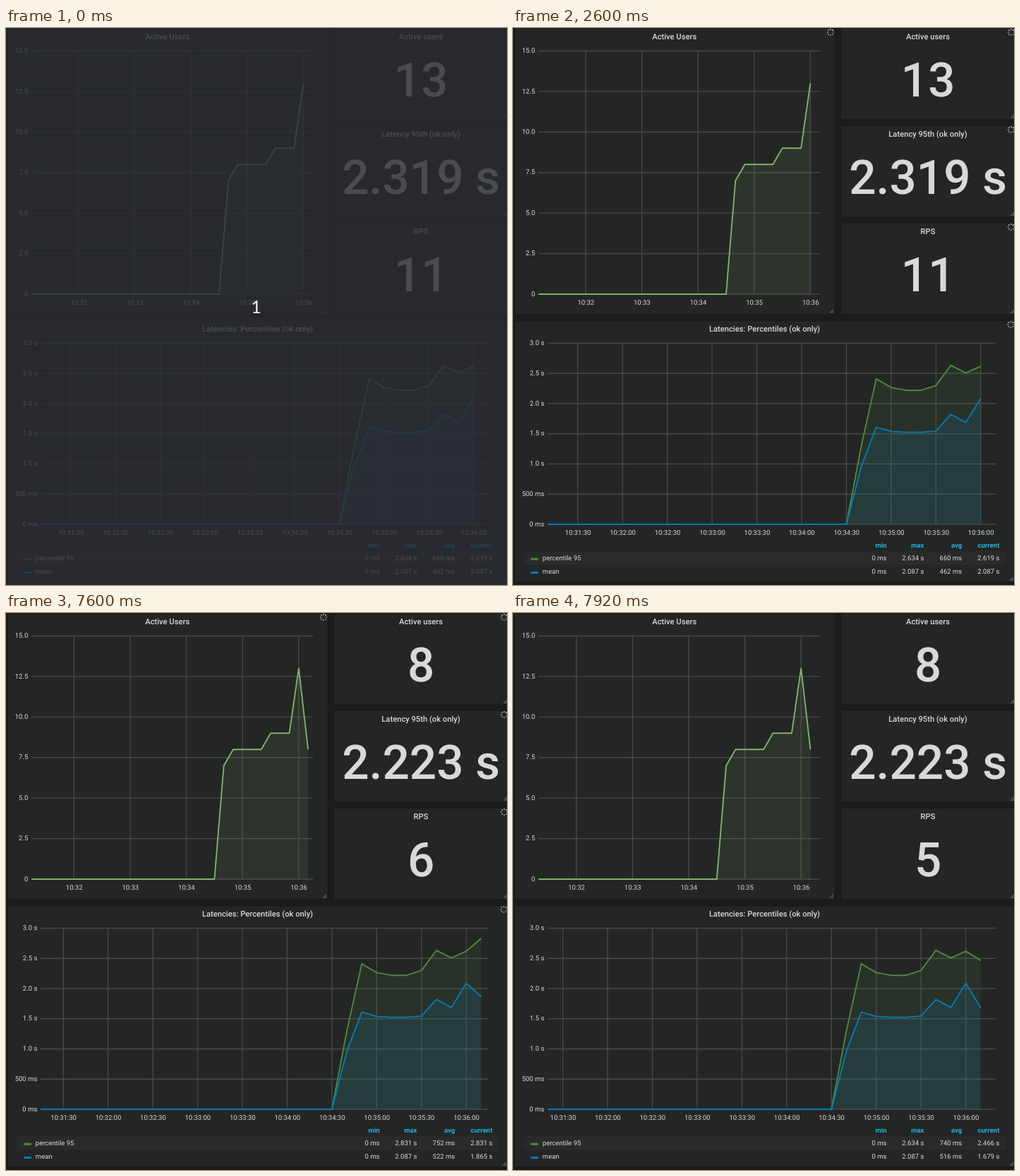
These frames come from a looping animation (710x789 px, 8000 ms). An HTML page:

```html
<!DOCTYPE html>
<html lang="en">
<head>
<meta charset="utf-8">
<title>Load test dashboard</title>
<style>
  html, body { margin: 0; width: 100%; height: 100%; overflow: hidden; background: #1a1b1b; }
  svg { display: block; width: 100vw; height: 100vh; text-rendering: geometricPrecision; }
  text { font: 9.5px Roboto, sans-serif; fill: #d8d9da; }
  .title { font-size: 11.2px; font-weight: 500; }
  .big { font-size: 67.5px; font-weight: 500; }
  .head { font-weight: 700; fill: #21b0e0; }
  .count { font: 25px Lato, sans-serif; fill: #f0f0f0; }
  .grid { stroke: #c8c8c8; stroke-opacity: .22; stroke-width: 1.3; fill: none; }
  .line { fill: none; stroke-width: 1.9; stroke-linejoin: round; }
</style>
</head>
<body>
<svg id="stage" viewBox="0 0 710 789"></svg>
<script>
const LOOP = 8000;
const stage = document.getElementById('stage');

// Seconds are counted from 10:34:30, one sample every ten seconds.
const users = [0, 7, 8, 8, 8, 8, 9, 9, 9, 13, 8];
const p95 = [0, 1.3, 2.41, 2.265, 2.22, 2.22, 2.3, 2.634, 2.507, 2.619];
const mean = [0, .96, 1.61, 1.54, 1.525, 1.525, 1.545, 1.82, 1.685, 2.087];

const states = [
  {
    big: ['13', '2.319 s', '11'], users: users.slice(0, 10), p95, mean, shift: [0, 0],
    rows: [['0 ms', '2.634 s', '660 ms', '2.619 s'], ['0 ms', '2.087 s', '462 ms', '2.087 s']]
  },
  {
    big: ['8', '2.223 s', '6'], users, p95: [...p95, 2.831], mean: [...mean, 1.865], shift: [6.6, 10.6],
    rows: [['0 ms', '2.831 s', '752 ms', '2.831 s'], ['0 ms', '2.087 s', '522 ms', '1.865 s']]
  },
  {
    big: ['8', '2.223 s', '5'], users, p95: [...p95, 2.466], mean: [...mean, 1.679], shift: [13.2, 21.2],
    rows: [['0 ms', '2.634 s', '740 ms', '2.466 s'], ['0 ms', '2.087 s', '516 ms', '1.679 s']]
  }
];

const usersPlot = {
  left: 36, right: 435, top: 32.5, base: 377, max: 15, zero: 302, sec: 1.327,
  labelX: 31.3, labels: ['0', '2.5', '5.0', '7.5', '10.0', '12.5', '15.0'],
  labelY: 391.7, first: -150, step: 60, ticks: 5
};
const latencyPlot = {
  left: 49, right: 684, top: 446.5, base: 703, max: 3, zero: 472.5, sec: 2.115,
  labelX: 44.3, labels: ['0 ms', '500 ms', '1.0 s', '1.5 s', '2.0 s', '2.5 s', '3.0 s'],
  labelY: 717.7, first: -180, step: 30, ticks: 10
};

const rect = (x, y, w, h, fill, extra = '') =>
  `<rect x="${x}" y="${y}" width="${w}" height="${h}" fill="${fill}" ${extra}/>`;
const text = (x, y, s, anchor = 'middle', cls = '') =>
  `<text x="${x}" y="${y}" text-anchor="${anchor}" class="${cls}">${s}</text>`;

function clock(sec, long) {
  const t = 34 * 60 + 30 + sec;
  const pad = n => String(n).padStart(2, '0');
  return '10:' + pad(Math.floor(t / 60)) + (long ? ':' + pad(t % 60) : '');
}

function axes(p, shift) {
  let path = '', out = '';
  p.labels.forEach((label, i) => {
    const y = p.base - (p.base - p.top) * i / (p.labels.length - 1);
    path += `M${p.left} ${y}H${p.right}`;
    out += text(p.labelX, y + 2.7, label, 'end');
  });
  for (let i = 0; i < p.ticks; i++) {
    const sec = p.first + i * p.step;
    const x = p.zero + sec * p.sec - shift;
    path += `M${x} ${p.top}V${p.base}`;
    out += text(x + .3, p.labelY, clock(sec, p.step < 60));
  }
  return `<path class="grid" d="${path}"/>` + out;
}

function series(p, data, shift, color, fillOpacity) {
  const x = i => p.zero + i * 10 * p.sec - shift;
  const y = v => p.base - v / p.max * (p.base - p.top);
  const d = `M${p.left} ${p.base}` + data.map((v, i) => `L${x(i).toFixed(2)} ${y(v).toFixed(2)}`).join('');
  return {
    area: `<path d="${d}V${p.base}Z" fill="${color}" fill-opacity="${fillOpacity}"/>`,
    line: `<path class="line" d="${d}" stroke="${color}"/>`
  };
}

function handle(x, y) {
  let out = '';
  for (let r = 0; r < 3; r++)
    for (let c = 2 - r; c < 3; c++) out += rect(x + c * 1.8, y + r * 1.8, 1.2, 1.2, '#777');
  return out;
}

function spinner(x, y, turn) {
  let out = '';
  for (let i = 0; i < 8; i++) {
    const a = (i + turn) * Math.PI / 4;
    out += `<circle cx="${x + 4.2 * Math.cos(a)}" cy="${y + 4.2 * Math.sin(a)}" r="1.1" fill="#c8c9ca" opacity="${.45 + i * .055}"/>`;
  }
  return out;
}

function legend(rows) {
  const cols = [529.5, 582.4, 636.2, 689.4];
  let out = rect(16, 741, 682, 19, '#292b2b');
  ['min', 'max', 'avg', 'current'].forEach((s, i) => out += text(cols[i], 736.4, s, 'end', 'head'));
  [['percentile 95', '#508642'], ['mean', '#0a78b0']].forEach(([name, color], r) => {
    const y = 753.6 + r * 19.4;
    out += rect(25, y - 2.9, 11, 3, color, 'rx="1"') + text(41.8, y, name, 'start');
    rows[r].forEach((s, i) => out += text(cols[i], y, s, 'end'));
  });
  return out;
}

function dashboard(s) {
  const [a, b] = s.shift;
  const u = series(usersPlot, s.users, a, '#7eb26d', .1);
  const p = series(latencyPlot, s.p95, b, '#508642', .13);
  const m = series(latencyPlot, s.mean, b, '#0a78b0', .14);
  let out = rect(0, 0, 710, 789, '#1a1b1b') + rect(3, 1, 452.5, 404, '#242625') + rect(3, 415.5, 707, 368.5, '#242625');
  ['Active users', 'Latency 95th (ok only)', 'RPS'].forEach((title, i) => {
    const y = 138 * i;
    out += rect(465.5, y + 1, 244.5, 128, '#242625') + text(588, y + 16, title, 'middle', 'title') +
      text(588.2, y + 97.4, s.big[i], 'middle', 'big') + handle(705, y + 123);
  });
  out += text(228.7, 16, 'Active Users', 'middle', 'title') +
    text(356.5, 430, 'Latencies: Percentiles (ok only)', 'middle', 'title');
  out += axes(usersPlot, a) + u.area + u.line;
  out += axes(latencyPlot, b) + p.area + m.area + p.line + m.line;
  return out + legend(s.rows) + handle(449, 398.5) + handle(704, 778);
}

const loading = turn =>
  [[450, 6], [706, 6], [706, 144], [706, 282], [705.5, 420]].map(([x, y]) => spinner(x, y, turn)).join('');

const countdown = rect(0, 0, 710, 789, '#282b31', 'opacity=".81"') + text(354.5, 403.6, '1', 'middle', 'count');

// Start time, data state, extra layer.
const scenes = [
  [0, 0, countdown],
  [100, 0, ''],
  [2600, 0, loading(0)],
  [2700, 1, ''],
  [7600, 1, loading(0)],
  [7700, 1, loading(1)],
  [7800, 2, '']
];

let shown = -1;
function render(time) {
  const t = time % LOOP;
  const k = scenes.findLastIndex(scene => scene[0] <= t);
  if (k === shown) return;
  shown = k;
  stage.innerHTML = dashboard(states[scenes[k][1]]) + scenes[k][2];
}

const start = performance.now();
function tick() {
  render(performance.now() - start);
  requestAnimationFrame(tick);
}
tick();
</script>
</body>
</html>
```
